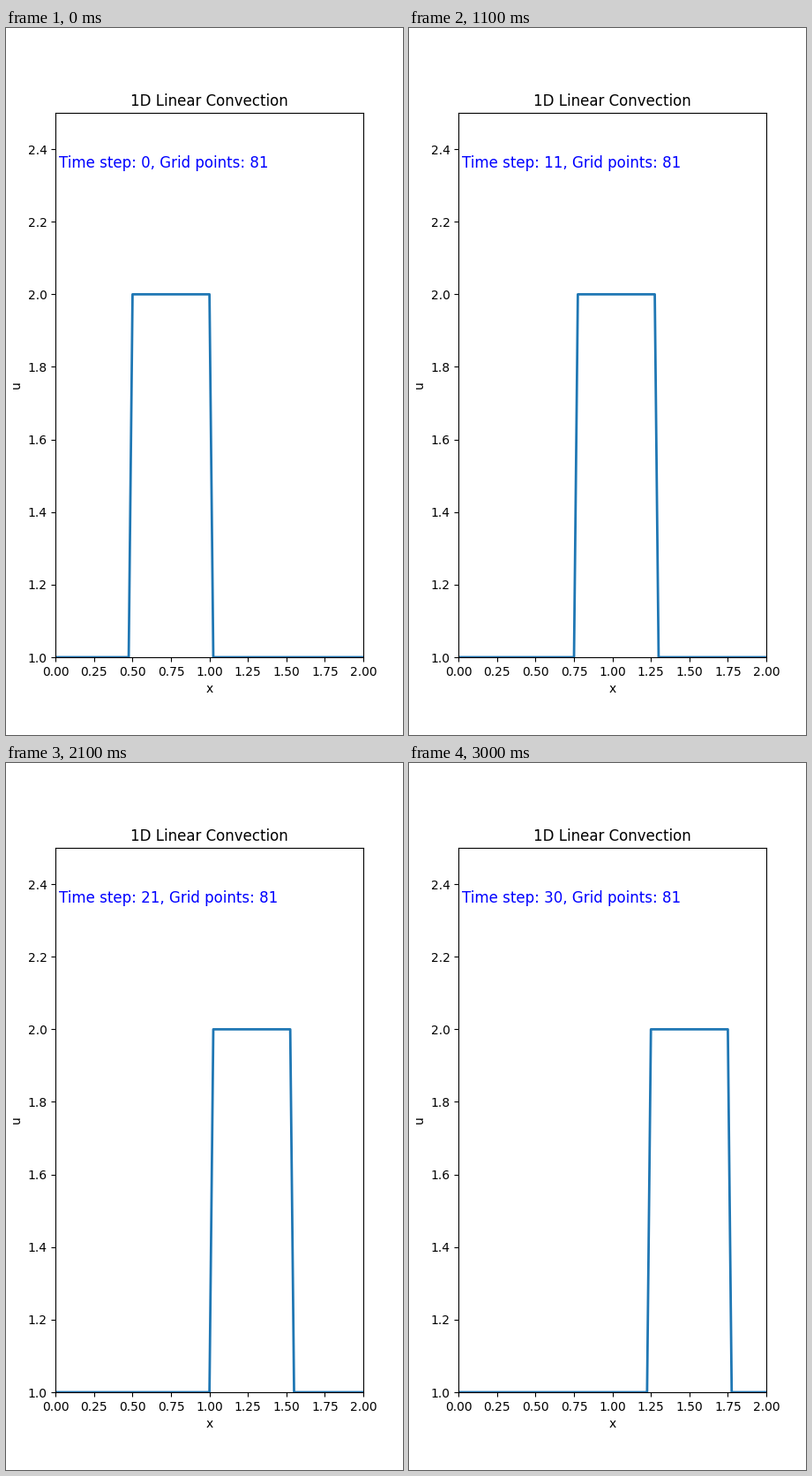
Write a matplotlib script that moves like this. It is 450x800 px and loops after 3100 ms.

```python
import numpy as np
import matplotlib.pyplot as plt
from matplotlib.animation import FuncAnimation

NX = 81
STEPS = 31
STEP_MS = 100

x = np.linspace(0, 2, NX)
start = np.ones(NX)
start[20:41] = 2  # square pulse on 0.5 <= x <= 1

plt.rcParams["font.family"] = "DejaVu Sans"
fig, ax = plt.subplots(figsize=(4.5, 8), dpi=100)
ax.set(xlim=(0, 2), ylim=(1, 2.5), xlabel="x", ylabel="u",
       title="1D Linear Convection")
ax.set_xticks(np.arange(0, 2.01, 0.25))
ax.set_yticks(np.arange(1, 2.5, 0.2))
line, = ax.plot(x, start, lw=2)
label = ax.text(0.01, 0.9, "", transform=ax.transAxes, fontsize=12, color="blue")


def update(step):
    # Courant number 1: the pulse moves exactly one cell per step
    line.set_ydata(np.roll(start, step))
    label.set_text(f"Time step: {step}, Grid points: {NX}")
    return line, label


anim = FuncAnimation(fig, update, frames=STEPS, interval=STEP_MS,
                     repeat=True, repeat_delay=0)
plt.show()
```
